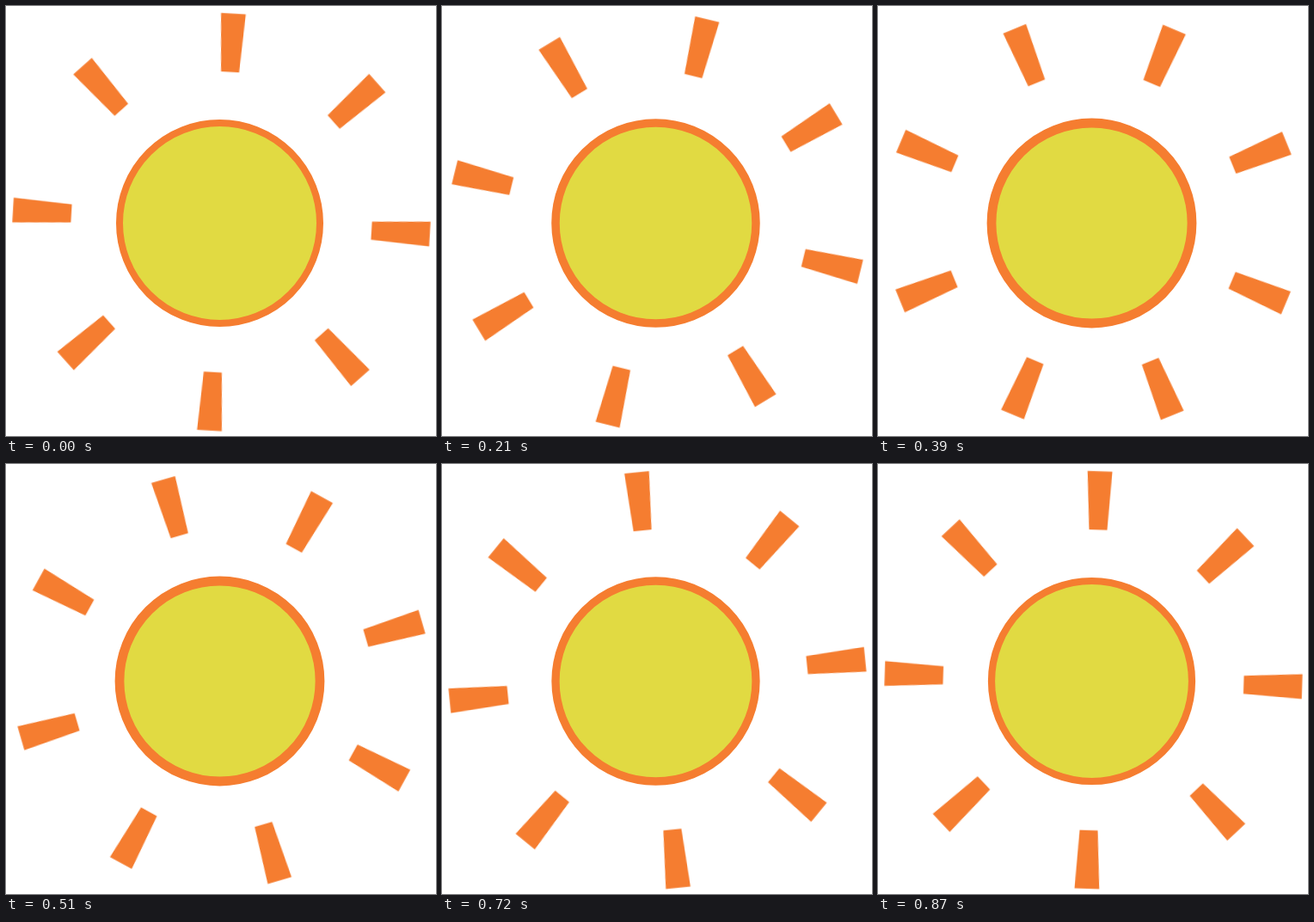
Animation, 500 px wide and 500 px high, one loop 900 ms. Source, as an HTML page without scripts:

```html
<!DOCTYPE html>
<html lang="en">
<head>
<meta charset="utf-8">
<title>Sun</title>
<style>
  html, body { margin: 0; width: 100%; height: 100%; overflow: hidden; background: #fff; }
  svg { display: block; width: 100%; height: 100%; }
  .rays { fill: #f57d30; animation: spin .9s steps(30) -4ms infinite; }
  .disc { fill: #e1da42; stroke: #f57d30; animation: pulse .9s steps(15) -4ms infinite; }

  /* One eighth of a turn brings each ray to its neighbour's place. */
  @keyframes spin {
    from { transform: rotate(3.3deg); }
    to { transform: rotate(48.3deg); }
  }
  @keyframes pulse {
    0%, 100% { stroke-width: 8px; }
    50% { stroke-width: 11.2px; }
  }
</style>
</head>
<body>
<svg viewBox="0 0 500 500">
  <defs>
    <path id="ray" d="M-14.4-242.8H14.4L10.5-174.8H-10.5Z"/>
    <g id="pair">
      <use href="#ray"/>
      <use href="#ray" transform="rotate(180)"/>
    </g>
  </defs>
  <g transform="translate(250.5 251.2)">
    <g class="rays">
      <use href="#pair"/>
      <use href="#pair" transform="rotate(45)"/>
      <use href="#pair" transform="rotate(90)"/>
      <use href="#pair" transform="rotate(135)"/>
    </g>
  </g>
  <circle class="disc" cx="248.5" cy="252.5" r="116.5"/>
</svg>
</body>
</html>
```
